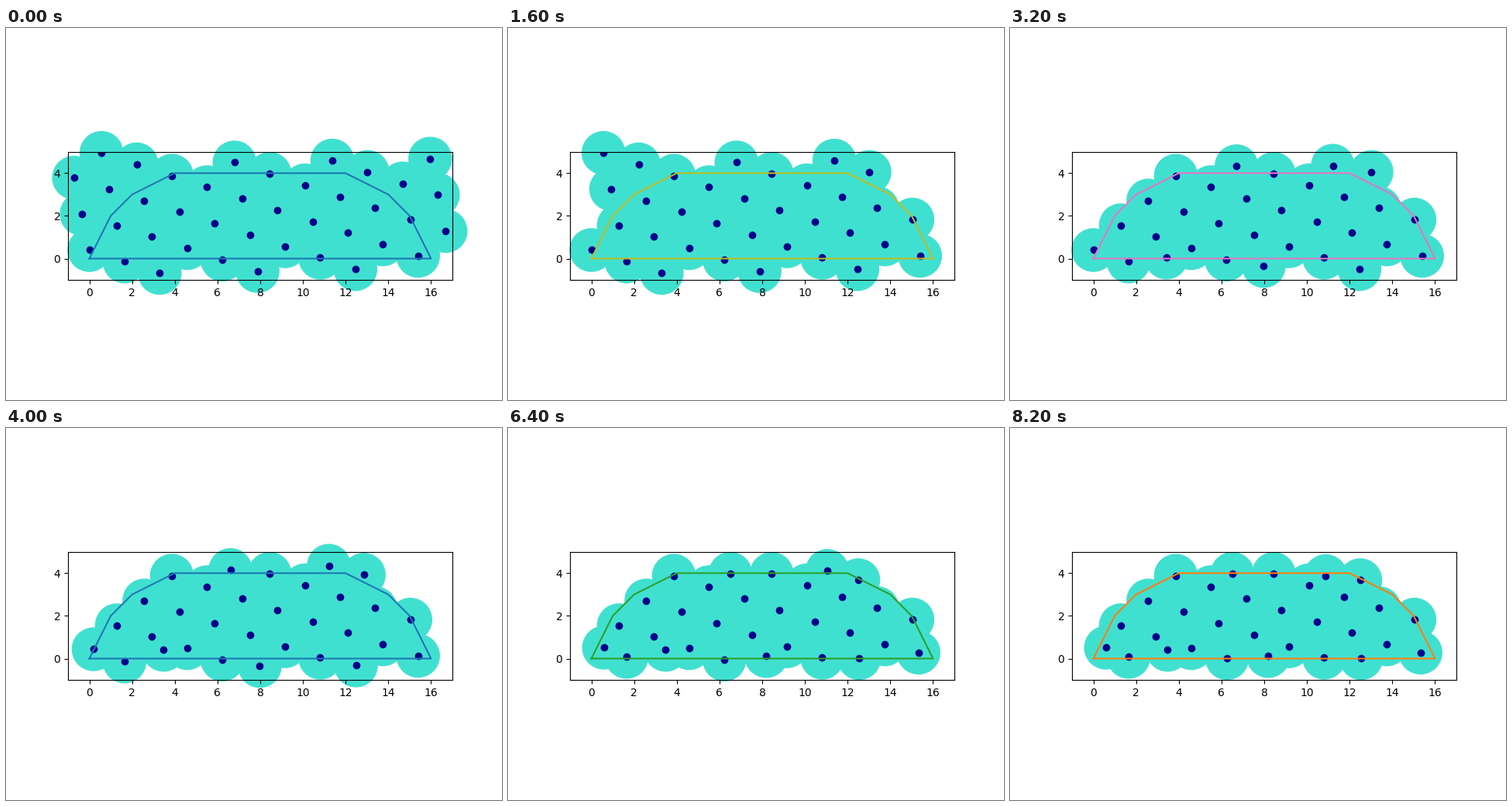
A matplotlib script that plays this animation: 640x480 px, repeating every 8.4 s.

```python
import numpy as np
import matplotlib.pyplot as plt
from matplotlib.animation import FuncAnimation
from matplotlib.patches import Circle

FRAMES, INTERVAL = 42, 200
X_LIM, Y_LIM = (-1, 17), (-1, 5)
OUTLINE = np.array([(0, 0), (1, 2), (2, 3), (4, 4), (12, 4),
                    (14, 3), (15, 2), (16, 0), (0, 0)])
MAX_GAP = 0.8        # discs centred farther outside than this are dropped
HUB = (7.3, 5.5)     # the farthest from here are dropped first
HOPS = 3             # a shifted disc reaches its goal in this many hops

# disc: (first step, last step, goal)
SHIFTS = {
    27: (5, 41, (10.88, 3.86)),
    20: (6, 36, (8.19, .12)),
    10: (12, 20, (3.48, .41)),
    17: (12, 28, (6.51, 3.97)),
    31: (14, 27, (12.5, 3.67)),
    30: (15, 31, (12.54, .02)),
    2: (18, 28, (.59, .51)),
    36: (26, 32, (15.32, .28)),
    6: (27, 32, (1.65, .08)),
    16: (32, 41, (6.26, .02)),
}


def polar(deg):
    """Lattice vector of a hexagonal covering by unit discs."""
    t = np.radians(deg)
    return np.sqrt(3) * np.array([np.cos(t), np.sin(t)])


def lattice():
    across, down = polar(-18), polar(-78)
    points = []
    for m in range(-2, 14):
        for n in range(-10, 5):
            x, y = np.array([0, .4]) + m * across + n * down
            if X_LIM[0] <= x <= X_LIM[1] and Y_LIM[0] <= y <= Y_LIM[1]:
                points.append((x, y))
    return np.array(points)


def gap(point):
    """Signed distance from the convex outline, positive outside."""
    edge = np.diff(OUTLINE, axis=0)
    dx, dy = (point - OUTLINE[:-1]).T
    return np.max((edge[:, 0] * dy - edge[:, 1] * dx) / np.hypot(*edge.T))


def drop_steps():
    """Step at which each spare disc goes: every step, then every other one."""
    spare = [i for i, p in enumerate(START) if gap(p) > MAX_GAP]
    spare.sort(key=lambda i: -np.hypot(*(START[i] - HUB)))
    return {i: max(rank, 2 * rank - 5) for rank, i in enumerate(spare, 1)}


START = lattice()
DROPS = drop_steps()


def centre(disc, step):
    if disc not in SHIFTS:
        return START[disc]
    first, last, goal = SHIFTS[disc]
    progress = np.clip((step - first) / (last - first), 0, 1)
    return START[disc] + (goal - START[disc]) * np.round(progress * HOPS) / HOPS


fig, ax = plt.subplots(figsize=(6.4, 4.8), dpi=100)
ax.set(xlim=X_LIM, ylim=Y_LIM, aspect="equal",
       xticks=range(0, 17, 2), yticks=range(0, 5, 2))

discs = [ax.add_patch(Circle(p, 1, color="turquoise", clip_on=False)) for p in START]
dots, = ax.plot([], [], "o", color="darkblue", zorder=1.5)
outline, = ax.plot(*OUTLINE.T)


def update(step):
    shown = []
    for i, disc in enumerate(discs):
        kept = step < DROPS.get(i, FRAMES)
        disc.set_visible(kept)
        if kept:
            disc.center = centre(i, step)
            shown.append(disc.center)
    dots.set_data(*zip(*shown))
    outline.set_color(f"C{step % 10}")
    return [*discs, dots, outline]


anim = FuncAnimation(fig, update, frames=FRAMES, interval=INTERVAL,
                     repeat=True, repeat_delay=0, blit=False)
plt.show()
```
